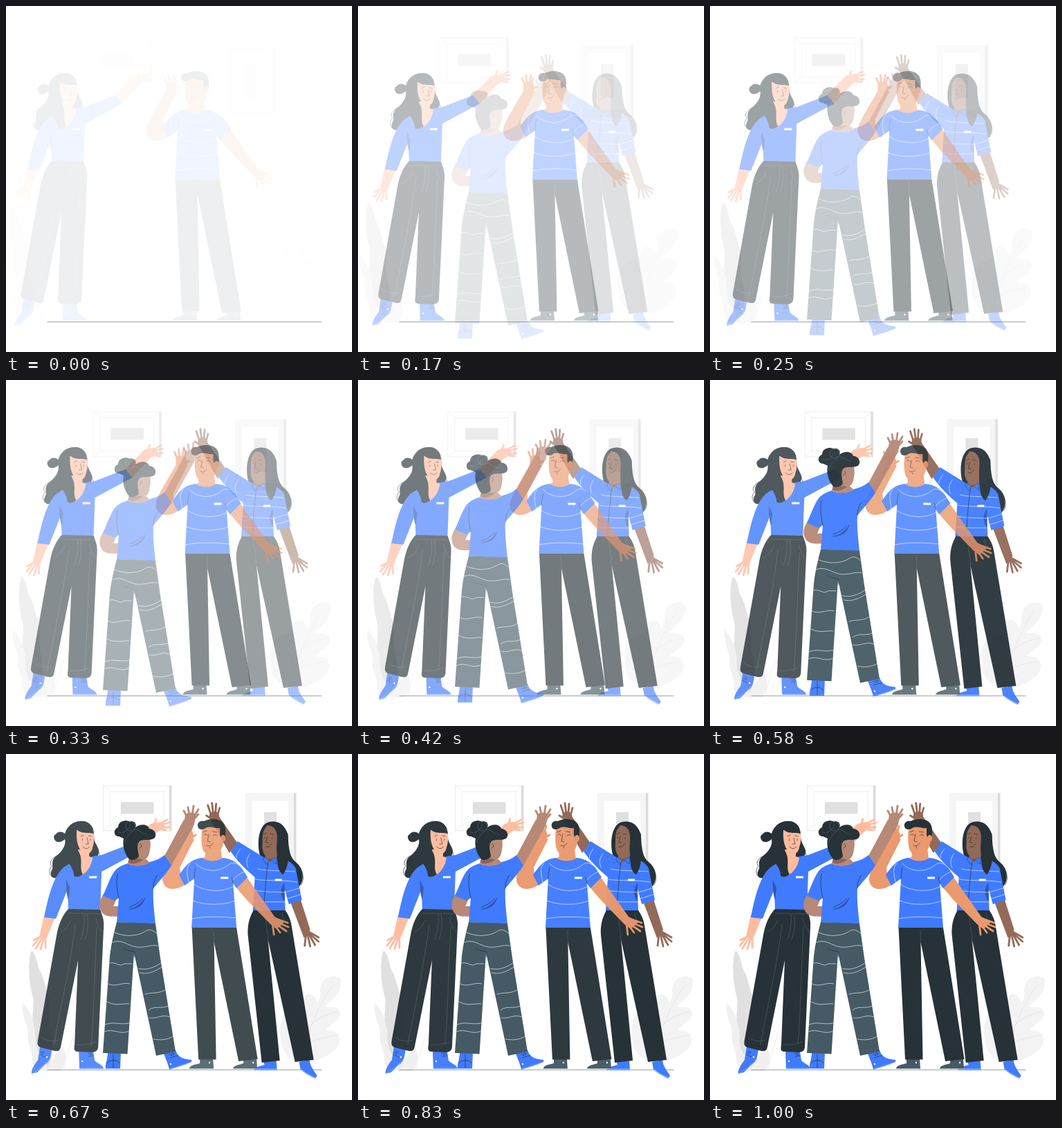
Recreate the animation shown at these times as an HTML page. Size 500x500 px, loop 1.04 s.

```html
<!DOCTYPE html>
<html lang="en">
<head>
<meta charset="utf-8">
<title>High five</title>
<style>
html, body { margin: 0; width: 100%; height: 100%; overflow: hidden; background: #fff; }
svg { display: block; width: 100vw; height: 100vh; }
path, ellipse { stroke-linecap: round; stroke-linejoin: round; }
.blue { fill: #407bff; }
.navy { fill: #2d56b3; }
.dark { fill: #263238; }
.gray { fill: #455a64; }
.white { fill: #fff; }
.line { fill: none; stroke: #263238; stroke-width: .7; }
.thin { fill: none; stroke: #5b6a71; stroke-width: .5; }
.stripe { fill: none; stroke: #fff; stroke-width: .6; }
.pale { fill: none; stroke: #e0e0e0; stroke-width: .6; }
.hand { fill: none; stroke-width: 2.8; }
.pink { fill: #ffbb9e; } .pink.hand { stroke: #ffbb9e; fill: none; }
.tan { fill: #eb996e; } .tan.hand { stroke: #eb996e; fill: none; }
.rose { fill: #b78876; } .rose.hand { stroke: #b78876; fill: none; }
.brown { fill: #936957; } .brown.hand { stroke: #936957; fill: none; }
</style>
</head>
<body>
<svg viewBox="0 0 500 500">
<g id="room">
  <path fill="#fff" stroke="#e6e6e6" stroke-width=".8" d="M141 46H236V111H141Z"/>
  <path fill="#dcdcdc" d="M236 45.500H239.500V111.500H236Z"/>
  <path class="pale" d="M151 54.500H228V103H151ZM141 46L151 54.500M236 46L228 54.500M141 111L151 103M236 111L228 103"/>
  <path fill="#e0e0e0" d="M166 69.500H213.500V86.500H166Z"/>
  <path fill="#f5f5f5" stroke="#ebebeb" stroke-width=".6" d="M346.500 57H416V160H346.500Z"/>
  <path fill="#dcdcdc" d="M416 56.500H419.500V160H416Z"/>
  <path fill="#fff" stroke="#eee" stroke-width=".6" d="M355 67H409V150H355Z"/>
  <path fill="#e0e0e0" d="M373 84H391V133H373Z"/>
  <path fill="#f0f0f0" d="M25 360C21 375 31 390 32 403C29 420 40 428 38 442C38 454 48 458 60 458H78C88 450 88 432 82 424C76 428 70 436 66 444C58 425 55 405 46 400C40 382 32 370 25 360Z"/>
  <path fill="#e0e0e0" d="M37 284C31 295 33 330 38 348C42 362 36 374 40 390C45 404 40 416 46 428C52 438 58 446 60 452C68 440 70 420 66 400C60 388 66 365 60 345C55 330 53 318 48 312C44 302 45 291 37 284Z"/>
  <path class="pale" d="M38 290C46 340 50 400 60 456M84 455C87 435 94 420 98 404"/>
  <path fill="#f3f3f3" d="M484 326C478 318 463 321 457 330C450 342 458 350 450 360C446 345 433 342 430 355C428 372 415 365 404 375C392 388 396 405 398 420C402 445 440 450 455 440C470 434 482 425 482 412C480 396 465 402 462 398C470 390 482 385 483 375C483 364 466 366 460 365C478 350 486 340 484 326Z"/>
  <path class="pale" d="M424 441C436 405 450 365 472 334M440 392C452 380 466 375 480 373M430 421C446 413 460 409 476 407M431 412C426 395 416 385 404 381"/>
</g>

<path class="line" style="stroke-width:.45" d="M60 456.500H456"/>

<g id="right">
  <path class="dark" d="M367 148C362 134 363 108 375 100C391 93 404 102 407 119C408 143 411 151 421 159C431 169 430 186 422 192C414 187 400 180 397 173Z"/>
  <path class="line" d="M411 152C424 157 431 174 428 184C427 190 421 192 417 191"/>
  <path class="brown" d="M294 93L307 90L334 129L322 143Z"/>
  <path class="brown" d="M294 86C298 82 304 82 307 87L308 95L297 99C294 95 292 91 294 86Z"/>
  <path class="brown hand" d="M296 89L291 74M299 87L297 71M302 87L303 72M305 89L308 78M297 94L289 89"/>
  <path class="brown" d="M410 213L425 210L439 254L430 266Z"/>
  <path class="brown hand" d="M433 260L431 277M435 260L439 278M437 260L446 276M437 259L451 271M437 257L451 265"/>
  <path class="blue" d="M324 141L334 126L373 150L390 149C400 151 412 154 418 165L427 211L408 217L402 195L403 227H356L359 178C345 166 334 155 324 141Z"/>
  <path class="navy" d="M402 186C395 195 396 206 402 213Z"/>
  <path class="stripe" d="M338 137C334 143 331 147 333 150M352 144C347 151 346 156 349 164M363 166C375 169 390 168 417 170M360 181C375 184 392 181 420 185M358 197C375 200 390 199 402 200M403 200L423 194M358 212C374 215 388 213 403 214M406 209L425 203"/>
  <path class="line" d="M378 156C375 180 373 205 372 226"/>
  <path class="brown" d="M376 143L391 137L392 150L380 158L373 150Z"/>
  <path class="brown" d="M370 113C368 128 369 141 374 147C382 153 391 143 395 128L392 106L377 103Z"/>
  <path class="dark" d="M376 102C387 103 392 111 391 124C390 140 391 148 392 160C393 168 397 173 400 174C407 164 409 150 406 134L407 116C399 98 382 94 376 102ZM378 101C370 108 370 119 370 126L369 146C363 128 365 110 378 101Z"/>
  <path class="blue" stroke="#263238" stroke-width=".5" d="M373 149L380 153L376 160L371 153ZM380 153L391 149L390 159L384 154Z"/>
  <path class="white" d="M388 180.500H398V183.500H388Z"/>
  <path class="line" d="M372 116L376 114M381 115L386 116M377 119L375 128L379 128M375 134C378 135 381 134 383 130M373.500 120V121.500M384 121V122.500"/>
  <path class="blue" d="M371 444L390 443L391 457H357C359 452 367 451 373 449ZM423 445L438 442C439 453 446 459 449 465L446 469C439 466 429 460 425 456Z"/>
  <path class="stripe" d="M358 455.500H390M426 456C433 462 440 465 446 468"/>
  <path class="dark" d="M357 226H403C408 233 411 240 412 248L444 442L417 445L378 268L395 443L369 446L349 262C348 248 351 236 357 226Z"/>
  <path class="thin" d="M378 268C377 255 375 242 373 228M398 230C399 238 402 243 407 245"/>
</g>

<g id="man">
  <path class="tan" d="M256 173L255 164L276 123L260 121C249 141 236 160 231 174C227 187 235 195 244 195C252 195 258 192 264 188Z"/>
  <path class="tan" d="M259 110L272 109L275 117L273 127L259 126Z"/>
  <path class="tan hand" d="M261 114L257 104M264 112L263 100M268 112L270 100M271 112L273 104M272 121L278 117"/>
  <path class="tan" d="M349 174L392 235L406 243L395 253L386 246L352 211L334 190Z"/>
  <path class="tan hand" d="M394 238L411 244M397 244L412 250M396 247L409 256M392 247L400 258M389 245L391 261"/>
  <path class="tan" d="M291 140L314 136L316 151C309 159 296 159 287 151L292 148Z"/>
  <path class="blue" d="M287 150C296 156 309 156 317 150C330 151 340 158 346 167L353 178L337 194L332 187L337 251H272L276 180L262 190L254 175C262 163 270 152 287 150Z"/>
  <path class="stripe" d="M278 158C287 169 310 174 327 159C333 156 338 158 343 163M275 188C290 199 317 201 333 191M274 212C291 219 318 219 335 212M273 238C293 234 317 235 337 237M270 158C265 163 264 169 268 185M332 182C337 175 343 173 348 170"/>
  <path class="line" d="M276 181C276 174 277 168 278 164M332 187L330 178"/>
  <path class="white" d="M314 177.500H325V180.500H314Z"/>
  <path class="tan" d="M288 104C285 118 286 132 289 140C295 148 307 147 313 140C318 134 319 125 319 117L314 101Z"/>
  <path class="dark" d="M283 108C278 103 282 95 290 97C298 93 310 93 316 98C322 103 322 113 320 122L316 124L313 117L313 107C306 108 300 104 294 106C290 109 286 110 283 108Z"/>
  <ellipse class="tan" cx="317.500" cy="122" rx="3.500" ry="5"/>
  <path class="line" d="M289 113L294 111M302 112L308 113M290 117C292 115 294 116 295 118M303 118C305 116 307 116 309 118M297 116L295 126L299 127M294 132C298 134 301 132 303 129M298 134L299 136"/>
  <path class="gray" d="M284 441H303L304 455H269C269 450 276 449 284 447ZM347 442L366 441L367 455H332C332 450 341 449 347 447Z"/>
  <path class="stripe" style="stroke:#90a4ae" d="M269 454.500H304M332 454.500H367"/>
  <circle class="white" cx="298" cy="446" r="1.200"/><circle class="white" cx="361" cy="446" r="1.200"/>
  <path class="dark" d="M272.500 251H337L367.500 441L340 444L304.500 272L307.500 441.500H282Z"/>
  <path class="thin" d="M304.500 272L304 254"/>
</g>

<g id="left">
  <path class="dark" d="M131 119C132 104 123 96 112 97C100 97 92 105 89 115C84 111 78 112 76 116C71 117 73 126 78 127C82 128 86 126 89 123C91 133 84 141 77 147C68 154 72 160 71 166C67 172 68 178 74 179C90 183 110 174 122 155C130 158 139 148 138 139C136 132 131 128 131 119Z"/>
  <path class="line" d="M77 147C68 152 66 158 70 162C64 168 67 178 74 179M137 139C139 144 140 149 140 153"/>
  <path class="pink" d="M183 131L213 101C220 98 228 97 231 100L233 106L222 113L194 143Z"/>
  <path class="pink hand" d="M226 101L237 95M227 103L240 99M227 106L239 106M224 108L235 110M218 102L221 94"/>
  <path class="pink" d="M59 232L75 236L63 265L52 264Z"/>
  <path class="pink hand" d="M55 262L43 277M57 264L47 281M59 265L54 282M61 264L61 280M55 263L44 269"/>
  <path class="blue" d="M90 162C99 155 119 149 142 146L186 129L196 141L142 170L140 226H94L93 195L76 238L59 236C64 211 72 173 90 162Z"/>
  <path class="pink" d="M108 138L124 139L124 148L129 150C127 163 120 172 112 176L101 164Z"/>
  <path class="navy" d="M91 182C90 195 92 205 94 211L96 193Z"/>
  <path class="pink" d="M106 110C105 126 108 136 115 143C122 148 128 142 129 135C132 126 132 118 130 110Z"/>
  <path class="dark" d="M104 106C110 117 123 113 131 115C129 102 115 96 104 101C96 107 95 130 92 143C88 155 102 162 102 176C106 179 111 177 115 174C109 164 116 154 109 141C104 132 107 122 104 112Z"/>
  <path class="line" d="M112 119L116 117M123 118L127 119M121 121L123 130L119 130M115 134C118 138 122 137 125 134M114.500 123V125M126 123V125"/>
  <path class="white" d="M124 176.500H135V179.500H124Z"/>
  <path class="blue" d="M53 423L70 427C68 438 68 444 61 448L49 460L41 462C40 457 44 450 50 442ZM109 428L130 430L132 443C138 449 144 449 145 455H110Z"/>
  <path class="stripe" style="stroke:#9fbdff" d="M42 461C52 457 60 448 66 442M110 454H144"/>
  <path class="line" d="M54 431C59 436 61 428 56 430M53 434L60 438M122 432C128 438 131 431 125 432M123 437L130 436"/>
  <circle class="white" cx="63" cy="438" r="1.200"/><circle class="white" cx="114" cy="444" r="1.200"/>
  <path class="dark" d="M94 224L140 225C143 233 146 240 145 250L137 424C136 430 132 431 127 431L106 430C102 429 102 426 103 420L108 298L83 423C82 429 79 430 74 429L54 424C49 422 49 418 50 413L77 262C80 245 86 232 94 224Z"/>
  <path class="thin" d="M94 230L141 231M117 231C118 245 116 258 112 268M121 231C124 245 121 262 118 268M104 246C98 300 82 370 73 420M135 250C132 310 131 370 127 421M83 257C91 253 95 247 98 240M134 238C136 248 140 254 144 258M55 409C57 413 71 417 79 414M106 420C115 421 126 419 133 416"/>
</g>

<g id="back">
  <path class="rose" d="M142 201C136 209 134 217 136 223C139 235 149 236 169 234L170 220H155L160 209Z"/>
  <path class="rose" d="M228 149L257 95L271 96L272 102L238 163Z"/>
  <path class="rose" d="M259 88C264 83 272 84 275 88L272 101L257 100Z"/>
  <path class="rose hand" d="M262 92L257 82M265 90L263 77M269 90L271 75M272 90L278 80M271 95L278 87"/>
  <path class="blue" d="M176 158C184 163 200 162 208 156C216 154 223 151 229 146L239 161C232 173 221 184 213 194C212 210 214 226 216 246L160 243L163 208L157 212L140 205C147 190 152 173 160 166C165 162 170 160 176 158Z"/>
  <path class="rose" d="M178 148L198 148L208 157C198 163 184 163 176 158Z"/>
  <path class="rose" d="M190 120L207 116C208 124 210 130 208 138C207 147 204 153 197 152L188 145Z"/>
  <path fill="#8c6254" d="M179 151L198 152C192 158 183 160 177 157Z"/>
  <path class="navy" d="M174 224C186 224 195 217 201 207C201 216 190 227 174 224Z"/>
  <path class="line" d="M163 208C160 195 159 183 161 173M178 221C186 219 193 214 197 209M213 194C213 187 215 180 219 175"/>
  <path class="dark" d="M163 119C155 119 155 108 162 106C162 97 173 94 179 98C187 96 189 102 187 106C197 99 206 103 207 108C217 109 218 119 214 122C206 126 200 122 193 126C188 131 191 140 192 148C189 153 181 154 178 152C171 144 168 132 170 122Z"/>
  <circle class="line" cx="180" cy="104" r="7" style="stroke:#52636b"/>
  <path class="thin" d="M162 113C169 116 176 111 179 104M187 109C178 114 173 120 172 128M188 109C194 111 198 116 203 116"/>
  <ellipse class="rose" cx="195" cy="133" rx="4" ry="5.500"/>
  <path class="line" d="M194 130C197 131 196 135 193 136"/>
  <path class="blue" d="M147 431H166L165 455H144C143 448 147 441 147 431ZM228 433L245 428C249 440 259 441 268 442L268 445C257 450 246 453 236 456C234 447 231 441 228 433Z"/>
  <path class="stripe" style="stroke:#9fbdff" d="M144 454.500H165M237 455L268 445"/>
  <path class="line" d="M146 447C149 441 161 441 164 447M155 434V453M236 434C243 438 247 430 239 433M237 439L248 436"/>
  <circle class="white" cx="238" cy="448" r="1.200"/>
  <path class="gray" d="M160 243L216 245L223 295L245 430L217 436L185 287L175.500 433.500L140 432L150 292C152 274 156 258 160 243Z"/>
  <path class="line" d="M169 281C174 284 180 285 185 285L186 294"/>
  <path class="stripe" d="M157 258C173 265 190 263 200 257C207 252 212 254 217 259M154 272C167 267 176 277 189 279C202 280 210 275 219 277M150 302C161 300 162 309 171 303L182 303M191 310C203 313 213 309 224 302M193 316C204 319 214 315 225 308M147 332C158 338 168 329 179 332M201 347C212 344 222 347 231 340M146 358C158 365 167 360 178 361M206 370C216 363 222 369 235 364M207 381C218 384 224 375 237 380M143 391C155 386 165 392 178 389M143 401C155 396 163 406 177 401M213 412C224 414 233 413 242 408"/>
</g>
</svg>
<script>
const LOOP = 1040, STEPS = 25;
const clamp = v => Math.max(0, Math.min(1, v));

function pose(id, opacity, x, y = 0) {
  const g = document.getElementById(id);
  g.setAttribute('opacity', opacity);
  g.setAttribute('transform', `translate(${x} ${y})`);
}

function draw(now) {
  // small lead: step times are rounded down to 10 ms
  const step = Math.floor((now % LOOP + 4) * STEPS / LOOP) % STEPS;
  const room = clamp((step + .5) / 16.5);
  const eased = 1 - (1 - (step + 1) / STEPS) ** 1.8;
  const late = clamp((step - 2.2) / 12.5);
  const sway = 2 * Math.sin(Math.PI * clamp((step - 15) / 10));
  pose('room', room, -30 * (1 - room));
  pose('man', eased, -30 * (1 - eased));
  pose('left', eased, -30 * (1 - eased));
  pose('right', late, -30 * (1 - late) + sway);
  pose('back', late, 0, 30 * (1 - late));
}

const start = performance.now();
function tick() {
  draw(performance.now() - start);
  requestAnimationFrame(tick);
}
tick();
</script>
</body>
</html>
```
